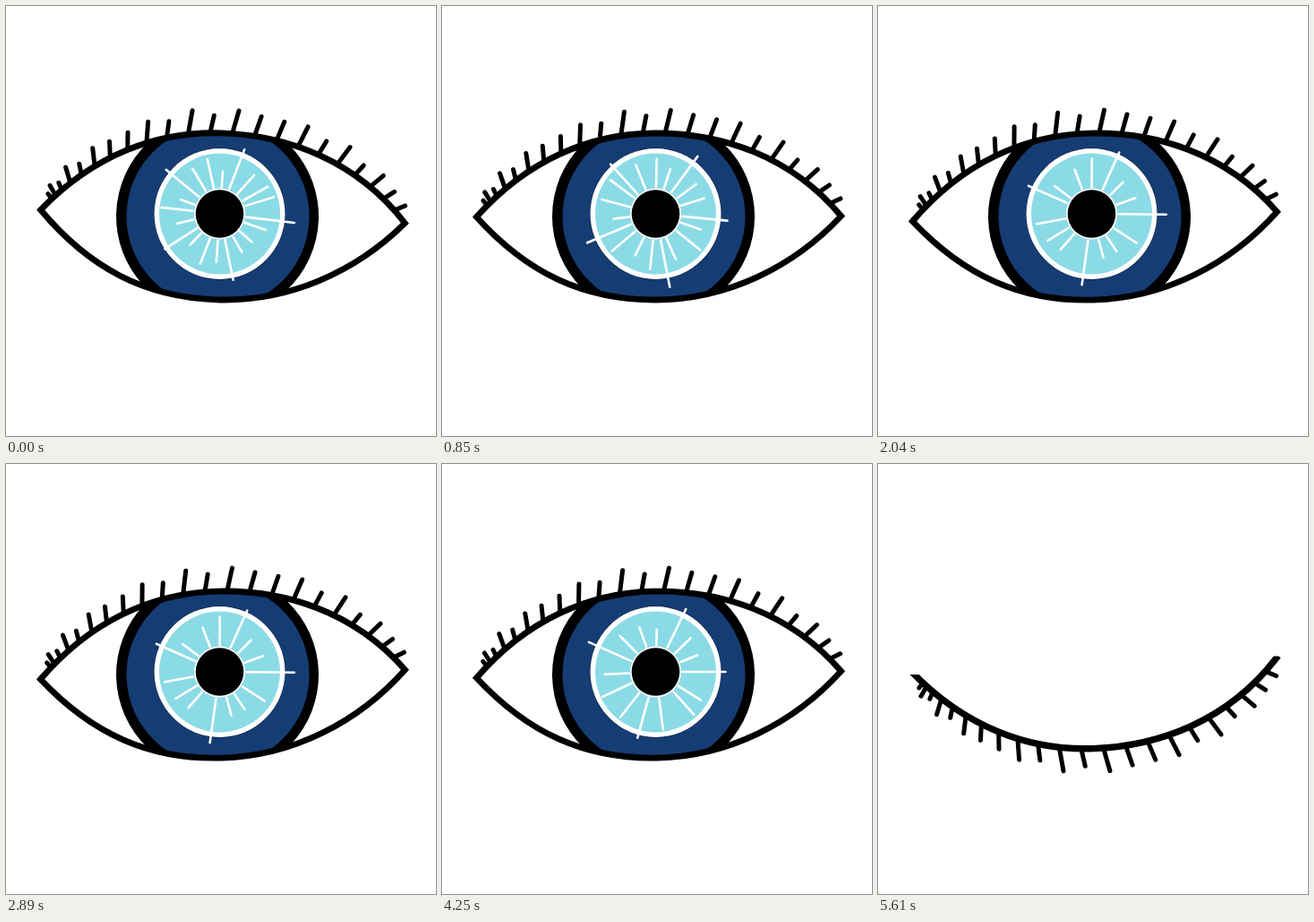
These frames come from a looping animation (480x480 px, 6630 ms). An HTML page with a canvas:

```html
<!DOCTYPE html>
<html lang="en">
<head>
<meta charset="utf-8">
<title>Blinking eye</title>
<style>
  html, body { margin: 0; width: 100%; height: 100%; overflow: hidden; background: #fff; }
  canvas { display: block; }
</style>
</head>
<body>
<canvas id="stage" width="480" height="480"></canvas>
<script>
const ctx = document.getElementById('stage').getContext('2d');
const { PI, sin, cos, sqrt, floor } = Math;
const STEP = 170;
const LASHES = 22;
const IRIS = { x: 238.5, y: 232 };

// One pose per step; "-" is the closed eye.
const SEQUENCE = '01234567----899768997----78676876------';

const upper = 'M38.5 235C95 172 165 142 238 142S389 167 445.5 235';
const topLid = new Path2D(upper);
const lids = new Path2D(upper + 'C392 292 318 328 238 328S95 298 38.5 235Z');
const lidY = x => 414 - sqrt(272 ** 2 - (x - 242) ** 2);
const radians = degrees => degrees * PI / 180;
const tiltOf = pose => 2.1 - .45 * pose;

function random(seed) {
  const v = sin(seed * 127.1) * 43758.5453;
  return v - floor(v);
}

function tilt(degrees) {
  ctx.translate(242, 235);
  ctx.rotate(radians(degrees));
  ctx.translate(-242, -235);
}

function pen(color, width, cap) {
  ctx.strokeStyle = color;
  ctx.lineWidth = width;
  ctx.lineCap = cap;
}

function disc(x, y, r, color) {
  ctx.fillStyle = color;
  ctx.beginPath();
  ctx.arc(x, y, r, 0, 2 * PI);
  ctx.fill();
}

// A line from (x, y), between two distances along an angle
function spoke(x, y, angle, from, to) {
  const c = cos(angle), s = sin(angle);
  ctx.beginPath();
  ctx.moveTo(x + from * c, y + from * s);
  ctx.lineTo(x + to * c, y + to * s);
  ctx.stroke();
}

// Lashes crowd towards the corners, fan outwards and alternate in length.
function drawLashes() {
  pen('#000', 5, 'round');
  for (let n = 0; n < LASHES; n++) {
    const x = 48 + 6 * n + 133 * (1 - cos(PI * (n - 1.2) / 22));
    const side = (n - 10) / 11;
    const lean = 8 + 32 * side + 25 * side ** 3;
    const length = 7 + 17 * sin(PI * n / 24) + 4 * cos(6 * PI * (n - 10) / 7);
    spoke(x, lidY(x), radians(lean - 90), 0, length);
  }
}

function drawRays(pose) {
  const seed = 100 * (pose + 1);
  const count = 15 + floor(7 * random(seed));
  pen('#fff', 2.6, 'round');
  for (let n = 0; n < count; n++) {
    const angle = 2 * PI * (n + .5 * random(seed + n)) / count;
    const spread = random(seed + n + 50);
    const reach = n % 4 ? 46 + 20 * spread : 72 + 12 * spread;
    spoke(IRIS.x, IRIS.y, angle, 30, reach);
  }
}

function drawIris(pose) {
  disc(IRIS.x, IRIS.y, 73.6, '#0b2147');
  disc(IRIS.x, IRIS.y, 73, '#fff');
  disc(IRIS.x, IRIS.y, 67.5, '#8bdbe6');
  drawRays(pose);
  disc(IRIS.x, IRIS.y, 28.5, '#fff');
  disc(IRIS.x, IRIS.y, 26.8, '#000');
}

function drawOpen(pose) {
  ctx.save();
  tilt(tiltOf(pose));
  ctx.save();
  ctx.clip(lids);
  disc(236, 235, 113, '#000');
  disc(236.5, 235, 102, '#153d74');
  ctx.restore();
  pen('#000', 6.8, 'butt');
  ctx.stroke(lids);
  drawLashes();
  ctx.restore();
  drawIris(pose);
}

// The closed lid is the upper lid turned upside down, cut level at both ends.
function drawClosed() {
  ctx.save();
  ctx.transform(1, 0, 0, -1, -1, 459.5);
  tilt(tiltOf(0));
  pen('#000', 7.4, 'square');
  ctx.stroke(topLid);
  drawLashes();
  ctx.restore();
  ctx.fillStyle = '#fff';
  ctx.fillRect(0, 0, 240, 235);
  ctx.fillRect(240, 0, 240, 214.5);
}

function draw() {
  const pose = SEQUENCE[floor(performance.now() / STEP) % SEQUENCE.length];
  ctx.fillStyle = '#fff';
  ctx.fillRect(0, 0, 480, 480);
  if (pose === '-') drawClosed();
  else drawOpen(Number(pose));
  requestAnimationFrame(draw);
}
draw();
</script>
</body>
</html>
```
